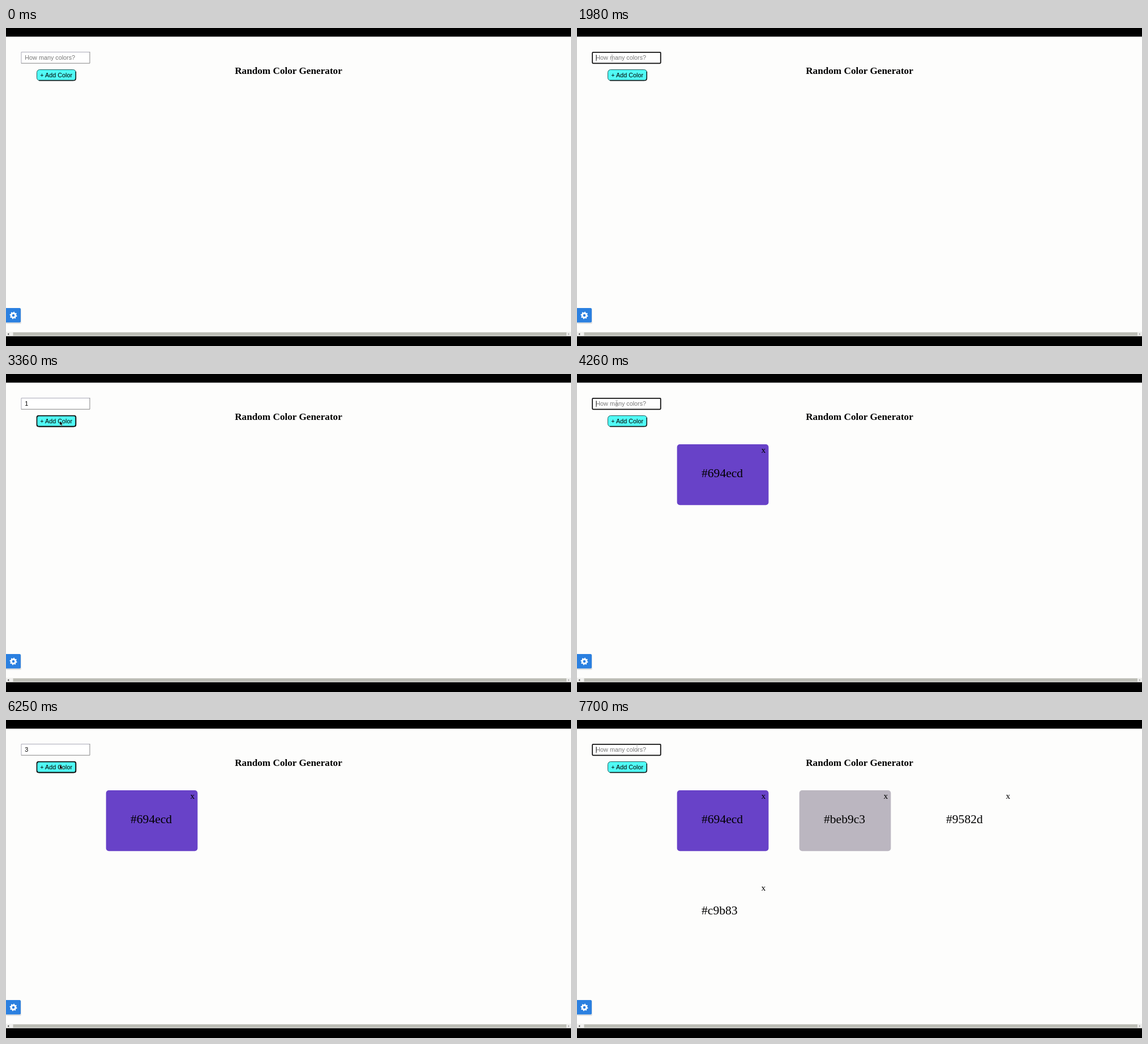
Recreate the animation shown at these times as an HTML page. Size 998 px wide and 561 px high, loop 8 s.

```html
<!DOCTYPE html>
<html lang="en">
<head>
<meta charset="utf-8">
<title>Random Color Generator</title>
<style>
  html, body { margin: 0; width: 100%; height: 100%; overflow: hidden; background: #fdfdfc; }
  svg { display: block; width: 998px; height: 561px; }
  .sans { font: 10.8px "Liberation Sans", Arial, sans-serif; }
  .serif { font: 21.6px "Liberation Serif", "Times New Roman", serif; }
  .title { font-size: 17.2px; font-weight: bold; text-anchor: middle; }
  .close { font-size: 15.5px; text-anchor: middle; }
  .ring { fill: none; stroke: #101010; stroke-width: 1.7; }
</style>
</head>
<body>
<svg viewBox="0 0 998 561">
  <rect width="998" height="561" fill="#fdfdfc"/>
  <text class="serif title" x="499" y="81">Random Color Generator</text>

  <rect x="27" y="42.5" width="121" height="20" fill="#fff"/>
  <path d="M27 62.5V42.5H148" fill="none" stroke="#aaaab8"/>
  <path d="M148 42V62.2H27" fill="none" stroke="#858585"/>
  <rect id="inputRing" class="ring" x="27.2" y="42.8" width="120.5" height="19.5" rx="1.5"/>
  <text id="field" class="sans" x="33.3" y="56"></text>
  <path id="caret" d="M0 47V58.5" stroke="#222" stroke-width=".9"/>

  <rect x="54.5" y="73.5" width="69" height="19.3" rx="5" fill="#50faf5" stroke="#285c5c"/>
  <path d="M123.3 77V88.5Q123.3 92.6 119 92.6H58" fill="none" stroke="#111" stroke-width="1.5"/>
  <rect id="buttonRing" class="ring" x="54.5" y="73.6" width="68.9" height="19" rx="3"/>
  <text class="sans" x="60.3" y="87">+ Add Color</text>

  <g id="cards"></g>

  <rect y="495" width="27" height="27" rx="2" fill="#000" opacity=".1"/>
  <path d="M0 494H24Q26 494 26 496V517.500Q26 519.500 24 519.500H0Z" fill="#2b80e0"/>
  <g transform="translate(13 507)">
    <path id="gear" fill="#fff"/>
    <circle r="2.3" fill="#2b80e0"/>
  </g>

  <rect y="536" width="998" height="8" fill="#f0f0ee"/>
  <rect x="12.500" y="537" width="977.500" height="5.700" fill="#bcbdb5"/>
  <path d="M5.200 538V542L2.700 540Z" fill="#444"/>
  <path d="M992.800 538V542L995.300 540Z" fill="#aaa"/>
  <path d="M0 0H998V15.300H0ZM0 543.700H998V561H0Z"/>

  <path id="arrow" d="M0 0V7.600L1.800 6L3.200 8.600L4.500 8L3.200 5.500H5.600Z" stroke="#fff" stroke-width=".4"/>
  <path id="beam" d="M-2-5.500Q0-5.500 0-4.500Q0-5.500 2-5.500M0-4.500V4.500M-2 5.500Q0 5.500 0 4.500Q0 5.500 2 5.500"
    fill="none" stroke="#999" stroke-width=".7"/>
</svg>
<script>
const LOOP = 8000;
const $ = id => document.getElementById(id);
const show = (el, on) => el.setAttribute("visibility", on ? "visible" : "hidden");
const within = (t, ...spans) => spans.some(([a, b]) => t >= a && t < b);

// Each card: label, column, row, fill (invalid hex codes have none), time added
const cards = [
  ["#694ecd", 0, 0, "#6842c8", 3510],
  ["#beb9c3", 1, 0, "#bbb6c0", 6430],
  ["#9582d", 2, 0, "none", 6430],
  ["#c9b83", 0, 1, "none", 6430]
];
$("cards").innerHTML = cards.map(([label, col, row, fill]) => `
  <g transform="translate(${176.7 + col * 216} ${124 + row * 161.7})">
    <rect width="161.700" height="107.300" rx="5" fill="${fill}"/>
    <text class="serif" x="43.300" y="57.600">${label}</text>
    <text class="serif close" x="152.600" y="15">x</text>
  </g>`).join("");
const cardNodes = [...$("cards").children];

// Eight-toothed cog
const cog = [];
for (let i = 0; i < 32; i++) {
  const a = (i + .5) * Math.PI / 16, r = i % 4 < 2 ? 6.6 : 5.1;
  cog.push(`${(r * Math.cos(a)).toFixed(2)} ${(r * Math.sin(a)).toFixed(2)}`);
}
$("gear").setAttribute("d", `M${cog.join("L")}Z`);

// Pointer stops: time, x, y
const path = [
  [1720, 0, 85], [1950, 62, 53], [2710, 62, 53], [3180, 95, 83],
  [3510, 95, 83], [3950, 70, 52], [4520, 70, 52], [4670, 95, 79],
  [4949, 95, 79], [4950, 72, 52], [5580, 72, 52], [6020, 95, 79],
  [7030, 95, 79], [7150, 101, 70], [7430, 106, 49], [LOOP, 106, 49]
];

function pointerAt(t) {
  const i = Math.max(1, path.findIndex(p => p[0] > t));
  const [t0, x0, y0] = path[i - 1], [t1, x1, y1] = path[i];
  const k = Math.max(0, (t - t0) / (t1 - t0));
  return [x0 + (x1 - x0) * k, y0 + (y1 - y0) * k];
}

function draw(t) {
  const value = within(t, [2560, 3510]) ? "1" : within(t, [5380, 6430]) ? "3" : "";
  $("field").textContent = value || "How many colors?";
  $("field").setAttribute("fill", value ? "#000" : "#777");

  show($("inputRing"), within(t, [1950, 3360], [4260, 6250], [7700, LOOP]));
  show($("buttonRing"), within(t, [3360, 4260], [6250, 7700]));
  show($("caret"), within(t, [1950, 2240], [2560, 3000], [4260, 4950], [5380, 5850], [7700, LOOP]));
  $("caret").setAttribute("transform", `translate(${value ? 40 : 34} 0)`);
  cardNodes.forEach((node, i) => show(node, t >= cards[i][4]));

  const [x, y] = pointerAt(t), moved = t >= path[0][0];
  const overInput = x > 27 && x < 148 && y > 42 && y < 63;
  for (const id of ["arrow", "beam"]) {
    show($(id), moved && overInput === (id === "beam"));
    $(id).setAttribute("transform", `translate(${x} ${y})`);
  }
}

const start = performance.now();
function tick() {
  draw((performance.now() - start) % LOOP);
  requestAnimationFrame(tick);
}
tick();
</script>
</body>
</html>
```
